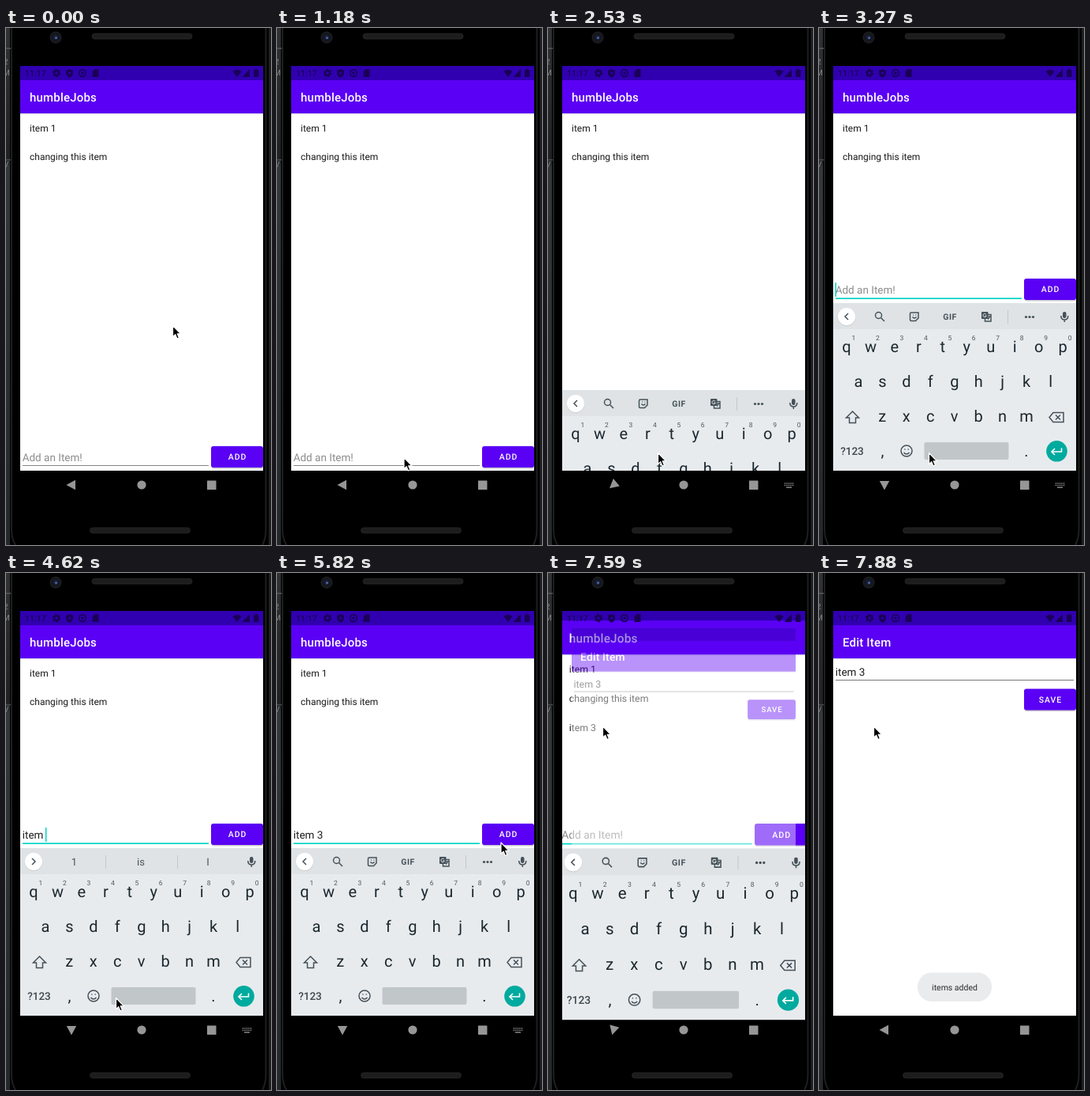
These frames come from a looping animation (336 by 654 pixels, 8 s). An HTML page:

```html
<!DOCTYPE html>
<html lang="en">
<head>
<meta charset="utf-8">
<title>To-do list demo</title>
<style>
  html, body { margin: 0; width: 100%; height: 100%; overflow: hidden; background: #000; }
  svg { display: block; width: 336px; height: 654px; font-family: Roboto, "Noto Sans", sans-serif; }
  text { white-space: pre; text-rendering: geometricPrecision; }
  .mid { text-anchor: middle; }
  .title { font-size: 15px; font-weight: 500; letter-spacing: .19px; fill: #fff; }
  .item { font-size: 12px; fill: #1c1c1c; }
  .field { font-size: 13.5px; fill: #1c1c1c; }
  .button { font-size: 10.5px; font-weight: 500; letter-spacing: .94px; fill: #fff; }
  .key { font-size: 20px; fill: #1b282e; text-anchor: middle; }
  .digit { font-size: 8.5px; fill: #4d585e; text-anchor: middle; }
  .word { font-size: 13px; fill: #48545a; text-anchor: middle; }
  .icon { fill: none; stroke: #455159; stroke-width: 1.5; }
</style>
</head>
<body>
<svg id="stage" viewBox="0 0 336 654" xmlns="http://www.w3.org/2000/svg"></svg>
<script>
const LOOP = 8000;
const PURPLE = '#5a00f4', DARK_PURPLE = '#3000b0', TEAL = '#00d5c3';
const CENTER = [172, 322];

const rect = (x, y, w, h, fill, more = '') =>
  `<rect x="${x}" y="${y}" width="${w}" height="${h}" fill="${fill}" ${more}/>`;
const circle = (x, y, r, fill, more = '') =>
  `<circle cx="${x}" cy="${y}" r="${r}" fill="${fill}" ${more}/>`;
const path = (d, more = 'class="icon"') => `<path d="${d}" ${more}/>`;
const text = (x, y, cls, value, id = '') =>
  `<text x="${x}" y="${y}" class="${cls}" ${id && `id="${id}"`}>${value}</text>`;

const appBar = title =>
  rect(18, 48, 308, 512, '#fff') + rect(18, 108, 308, 1.5, '#e4e4e8') +
  rect(18, 48, 308, 60, PURPLE) + rect(18, 48, 308, 18, DARK_PURPLE) +
  text(30, 93, 'title', title);

const button = (y, label, id) =>
  rect(260.5, y + 1, 65.5, 27.5, '#c9c9cf', 'rx="3"') +
  rect(260, y, 66, 27, PURPLE, `rx="3" id="${id}"`) +
  text(293.5, y + 17.3, 'button mid', label);

function phone() {
  return rect(0, 0, 336, 654, '#000') +
    rect(0, 0, 5, 654, 'url(#backdrop)') +
    rect(0, 25, 6, 1.5, '#55585b') + rect(0, 166, 6, 1.5, '#45484b') +
    '<g font-size="10" fill="#85888b"><text x="-3" y="46">2</text><text x="-4" y="60">M</text><text x="-3" y="176">V</text></g>' +
    path('M7 0V634Q7 646 12 654M329.5 0V634Q329.5 646 325 654', 'fill="none" stroke="#1d1f20" stroke-width="2"') +
    rect(333, 0, 3, 654, '#1c1e20') +
    rect(109, 7, 127, 7, '#1d1d1d', 'rx="3.5" stroke="#2a2a2a" stroke-width=".7"') +
    rect(106.5, 632, 127, 7, '#1d1d1d', 'rx="3.5" stroke="#2a2a2a" stroke-width=".7"') +
    circle(63, 12, 7, '#15171b', 'stroke="#222428"') + circle(63, 12, 3, '#172142') +
    circle(63.5, 12.5, 1.2, '#637bb8');
}

function statusBar() {
  const ink = '#1a0058';
  return `<g fill="${ink}">` +
    `<text x="24" y="61" font-size="10.5" font-weight="500">11:17</text>` +
    circle(64, 57, 3, 'none', `stroke="${ink}" stroke-width="2.4"`) +
    circle(64, 57, 4.6, 'none', `stroke="${ink}" stroke-width="1.5" stroke-dasharray="2.4 2.4"`) +
    path('M80.5 52l4.5 1.7v3q0 4-4.5 6q-4.5-2-4.5-6v-3z', '') + circle(80.5, 57, 1.5, DARK_PURPLE) +
    circle(97, 57, 4.4, 'none', `stroke="${ink}" stroke-width="1.6"`) + circle(97, 57, 1.8, ink) +
    path('M109.5 55l3-3h5v10h-8z', '') +
    path('M287.5 55q5.5-4.5 11 0l-5.5 7z', '') + path('M309 52v10h-9.5z', '') +
    rect(314, 53, 6.5, 9, ink, 'rx="1"') + rect(315.7, 51.8, 3, 2, ink) + '</g>';
}

function mainScreen() {
  return appBar('humbleJobs') +
    text(30, 130.5, 'item', 'item 1') + text(30, 166.5, 'item', 'changing this item') +
    rect(18, 180, 308, 36, '#dcdcdc', 'id="press"') + text(30, 202.5, 'item', 'item 3', 'added') +
    '<g id="entry">' +
    '<text x="20.7" y="548" class="field" id="typed"></text>' +
    rect(21, 550, 0, 1, '#1c1c1c', 'id="composing"') + rect(21, 553, 236, 1, '#858585', 'id="line"') +
    rect(21, 534, 1.5, 18, TEAL, 'id="caret"') + button(529, 'ADD', 'add') + '</g>';
}

function editScreen() {
  return appBar('Edit Item') + text(20.7, 129.5, 'field', 'item 3') +
    rect(21, 135, 302, 1, '#787878') + button(146.5, 'SAVE', 'save');
}

function toolbar() {
  return '<g id="tools">' +
    circle(75.5, 363.5, 4, 'none', 'class="icon"') + path('M78.5 366.5l4.5 4.5') +
    path('M117 360h9v7l-3.5 3.5h-5.5q-1.5 0-1.5-1.5v-7.5q0-1.5 1.5-1.5M118.5 365.5q2.5 3 5 0M119 363h.8M122.5 363h.8') +
    '<text x="166" y="368.8" class="mid" font-size="10.5" font-weight="700" fill="#455159" letter-spacing=".5">GIF</text>' +
    rect(206, 359, 8.5, 9, '#455159', 'rx="1"') +
    path('M214 362.500h4v8.500h-7.500v-3M214.500 365h3M216 364.500q0 3-2 4') +
    path('M212 362.300a2.200 2.200 0 1 0 .3 1.700h-2', 'fill="none" stroke="#dfe3e5"') +
    rect(239, 357, 1, 17, '#c2c8cb') +
    [262.5, 267, 271.5].map(x => circle(x, 365.5, 1.6, '#455159')).join('') + '</g>' +
    '<g id="words">' + rect(126, 357, 1, 17, '#c2c8cb') + rect(217, 357, 1, 17, '#c2c8cb') +
    [86.5, 171, 256].map((x, i) => text(x, 370, 'word', '', 'word' + i)).join('') + '</g>' +
    circle(35, 366, 11.3, '#cfd4d7') + circle(35, 365, 11, '#fff') +
    path('M37 361l-4 4l4 4', 'class="icon" id="chevron"') +
    rect(309, 359, 4.5, 8, '#455159', 'rx="2.2"') + path('M306.8 364q0 5 4.5 5t4.5-5M311.3 369v3');
}

function keyboard() {
  const row = (letters, x, y) =>
    [...letters].map((c, i) => text(x + i * 30.45, y, 'key', c)).join('');
  const digits = [...'1234567890'].map((c, i) => text(44 + i * 30.45, 395.3, 'digit', c)).join('');
  return rect(18, 348, 308, 212, '#e8ebee') + rect(18, 348, 308, 33, '#dfe3e5') + toolbar() +
    row('qwertyuiop', 35, 410) + digits + row('asdfghjkl', 50, 454) + row('zxcvbnm', 80.3, 498) +
    path('M42.5 485l8 8h-4v6.5h-8v-6.5h-4z') +
    path('M297 486.5h13v12h-13l-5-6zM300 489.5l6 6M306 489.5l-6 6') +
    '<text x="42" y="540" class="mid" font-size="13.5" font-weight="500" fill="#3c484e">?123</text>' +
    text(80.5, 542, 'key', ',') + text(263, 542, 'key', '.') +
    circle(111, 535, 7, 'none', 'class="icon"') + path('M107.5 537q3.5 4 7 0M108.3 533h1.2M112.6 533h1.2') +
    rect(133.5, 524, 107, 22, '#c1c6c9', 'rx="2"') +
    circle(301.5, 535.3, 13.3, '#00aa9e') +
    path('M307.5 531.5v4.5h-12M299 532l-4 4l4 4', 'fill="none" stroke="#fff" stroke-width="1.6"');
}

function navBar() {
  const ink = '#969696';
  const dots = [576, 578.5].map(y =>
    [300.5, 303, 305.5, 308, 310.5].map(x => rect(x - .7, y - .7, 1.4, 1.4, ink)).join('')).join('');
  return path('M76.5 578l11.5-6.2v12.4z', `fill="${ink}" id="back"`) +
    circle(172, 578, 5.6, ink) + rect(255, 572.5, 11.5, 11.5, ink, 'rx=".5"') +
    `<g id="imeIcon">${dots}${rect(302, 580.5, 7, 1.3, ink)}</g>`;
}

const stage = document.getElementById('stage');
stage.innerHTML = `
  <defs>
    <linearGradient id="backdrop" x2="0" y2="1">
      <stop offset="0" stop-color="#303234"/><stop offset=".25" stop-color="#1f2123"/>
      <stop offset=".27" stop-color="#34383b"/><stop offset="1" stop-color="#24282b"/>
    </linearGradient>
    <clipPath id="screen">${rect(18, 48, 308, 548, '#000')}</clipPath>
    <clipPath id="content">${rect(18, 48, 308, 512, '#000')}</clipPath>
  </defs>
  ${phone()}
  <g clip-path="url(#screen)">
    <g id="main"><g clip-path="url(#content)">${mainScreen()}</g></g>
    <g id="edit">${editScreen()}</g>
    ${rect(18, 560, 308, 36, '#000')}
    <g id="imeZoom"><g clip-path="url(#content)"><g id="ime">${keyboard()}</g></g></g>
    ${navBar()}${statusBar()}
    <g id="toast">${rect(125, 505.5, 94, 36.5, '#eaebec', 'rx="18"')}
      <text x="172" y="528" class="mid" font-size="10.5" fill="#2b2b2b">items added</text></g>
  </g>
  <path id="cursor" d="M0 0V14.2L3.2 11.2L5.4 16.5L7.9 15.4L5.7 10.3H10z" fill="#000" stroke="#fff" stroke-width="1.2" stroke-linejoin="round"/>`;

const el = {};
stage.querySelectorAll('[id]').forEach(node => el[node.id] = node);

// Each track lists [start time, value]; values hold until the next start.
const tracks = {
  cursor: [[0, [211.5, 376.5]], [140, [213, 358]], [290, [212, 345]], [440, [209, 384]], [590, [194, 460]],
    [740, [174, 519]], [880, [163, 543.5]], [1180, [161, 543.5]], [1930, [152, 541]], [2080, [144, 539]],
    [2230, [139.5, 537.5]], [5220, [163, 520]], [5370, [214, 459]], [5520, [262, 390]], [5820, [284, 341]],
    [5970, [288, 331]], [6420, [247, 309]], [6560, [160, 273]], [6710, [107.5, 252]], [6850, [77, 214]],
    [7000, [71, 199]], [7150, [69.5, 194]]],
  typed: [[0, ''], [4020, 'it'], [4320, 'item'], [4620, 'item '], [5070, 'item 3'], [6270, '']],
  words: [[0, null], [4020, ['it’s', 'it', 'its']], [4320, ['items', 'item', 'itemized']],
    [4620, ['1', 'is', 'I']], [5070, null]],
  caret: [[0, 0], [2380, 1], [2820, 0], [3270, 1], [3720, 0], [4020, 1], [5520, 0], [5970, 1],
    [6420, 0], [7000, 1], [7440, 0]],
  lift: [[0, 0], [2670, 212]],
  imeDrop: [[0, 212], [2530, 110], [2670, 18], [2820, 0], [7730, 212]],
  backAngle: [[0, 0], [2530, -40], [2670, -80], [2820, -90], [7590, -75], [7730, -16], [7880, 0]],
  toast: [[0, 0], [6270, .5], [6420, 1], [7590, 0], [7730, 1]],
  mainZoom: [[0, 1], [7590, 1.023], [7730, 1.045]],
  editZoom: [[0, .85], [7590, .922], [7730, .988], [7880, 1]],
  editAlpha: [[0, 0], [7590, .42], [7730, 1]]
};

function valueAt(name, t) {
  let value;
  for (const [start, v] of tracks[name]) if (start <= t) value = v;
  return value;
}

const set = (node, attrs) => {
  for (const key in attrs) node.setAttribute(key, attrs[key]);
};
const show = (node, on) => set(node, { visibility: on ? 'visible' : 'hidden' });
const zoom = s => `translate(${CENTER}) scale(${s}) translate(${CENTER.map(v => -v)})`;

function draw(t) {
  const v = {};
  for (const name in tracks) v[name] = valueAt(name, t);
  const focused = t >= 2380;

  set(el.cursor, { transform: `translate(${v.cursor})` });
  set(el.entry, { transform: `translate(0 ${-v.lift})` });
  el.typed.textContent = v.typed || 'Add an Item!';
  el.typed.style.fill = v.typed ? '#1c1c1c' : '#8c8c8c';
  const width = v.typed ? el.typed.getComputedTextLength() : 0;
  set(el.caret, { x: 20.5 + width * .98 });
  show(el.caret, v.caret);
  set(el.composing, { width: t >= 4020 && t < 4620 ? width : 0 });
  set(el.line, { y: focused ? 553.3 : 553, height: focused ? 1.7 : 1, fill: focused ? TEAL : '#858585' });

  set(el.add, { fill: t >= 6120 && t < 6420 ? '#7832f6' : PURPLE });
  show(el.added, t >= 6270);
  show(el.press, t >= 7440 && t < 7590);

  show(el.tools, !v.words);
  show(el.words, v.words);
  (v.words || ['', '', '']).forEach((word, i) => el['word' + i].textContent = word);
  set(el.chevron, { transform: v.words ? 'rotate(180 35 365)' : '' });

  set(el.ime, { transform: `translate(0 ${v.imeDrop})` });
  set(el.imeZoom, { transform: zoom(v.mainZoom) });
  set(el.main, { transform: zoom(v.mainZoom) });
  set(el.edit, { transform: zoom(v.editZoom), opacity: v.editAlpha });
  set(el.back, { transform: `rotate(${v.backAngle} 83 578)` });
  show(el.imeIcon, focused && t < 7590);
  set(el.toast, { opacity: v.toast });
}

const began = performance.now();
function tick() {
  draw((performance.now() - began) % LOOP);
  requestAnimationFrame(tick);
}
tick();
</script>
</body>
</html>
```
